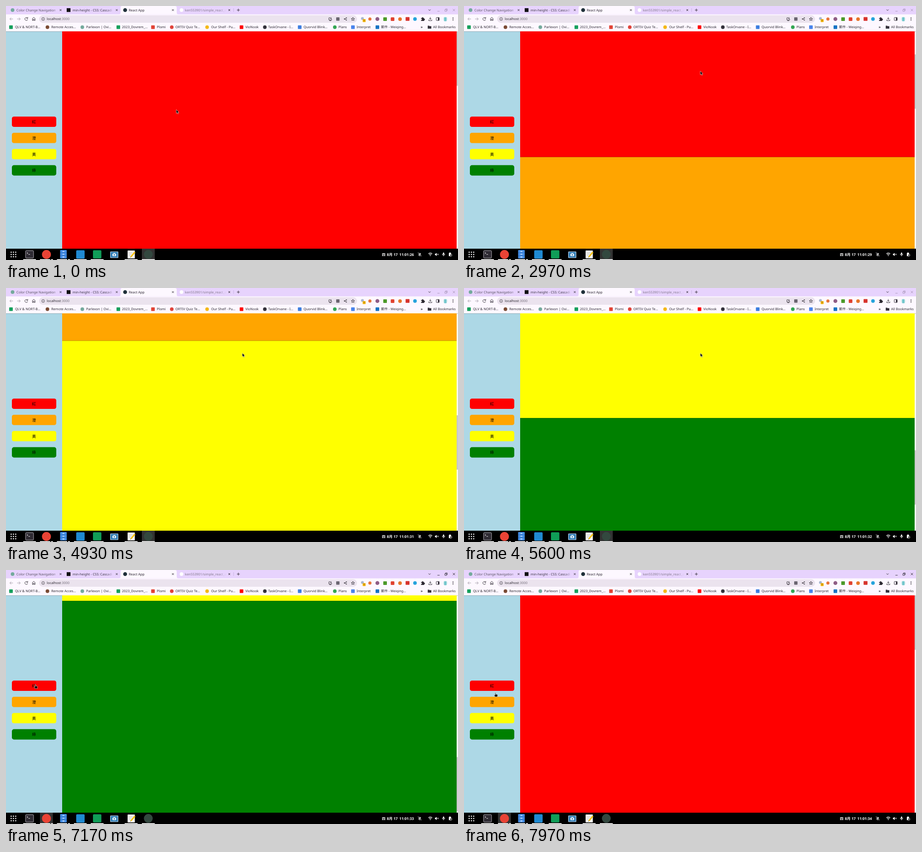
An HTML page for the animation above (8000 ms loop, 998x561 px).

```html
<!DOCTYPE html>
<html lang="zh-Hant">
<head>
<meta charset="utf-8">
<title>React App</title>
<style>
@property --scroll { syntax: "<number>"; inherits: true; initial-value: 0; }
html, body { margin: 0; width: 100%; height: 100%; overflow: hidden; background: #000; }
svg { display: block; width: 998px; height: 561px; }
text {
  font: 7.4px "Noto Sans", "Noto Sans CJK TC", sans-serif;
  fill: #2b2730; text-rendering: geometricPrecision; white-space: pre;
}
.line { fill: none; stroke: #36313b; stroke-width: 1; }
.dim { stroke: #a69eac; }
.btn text { font-family: "Noto Sans CJK TC", "Noto Sans CJK", sans-serif; font-size: 8.6px; fill: #000; text-anchor: middle; }
.clock text { font-size: 8px; font-weight: 600; fill: #fff; }
.tray { fill: none; stroke: #fff; stroke-width: 1; }

#web { animation: scroll 8s infinite linear; }
#page { transform: matrix(1, 0, 0, 1, 0, calc(var(--scroll) * -1)); }
#thumb { transform: matrix(1, 0, 0, 1, 0, calc(var(--scroll) * .25)); }
#cursor { animation: move 8s infinite ease-in-out; }
#secs { animation: tick 8s infinite; }
.focus { opacity: 0; animation: show 8s infinite step-end; }
.blur { animation: hide 8s infinite step-end; }
#arrow { animation: arrow 8s infinite step-end; }
#hand { opacity: 0; animation: hand 8s infinite step-end; }

@keyframes scroll {
  0%, 28% { --scroll: 0; }
  28.375% { --scroll: 8; animation-timing-function: ease-out; }
  30.875%, 33.375% { --scroll: 62; }
  43.375%, 48.5% { --scroll: 435; }
  48.75% { --scroll: 436.5; }
  57.5%, 60% { --scroll: 852; }
  61.625% { --scroll: 899; }
  70% { --scroll: 1208; animation-timing-function: ease-out; }
  77.5%, 89.04% { --scroll: 1440; animation-timing-function: ease-in-out; }
  98.04%, 100% { --scroll: 0; }
}
@keyframes move {
  0%, 4% { transform: matrix(1, 0, 0, 1, 376, 228.8); }
  23%, 28.4% { transform: matrix(1, 0, 0, 1, 521.5, 142.4); }
  31%, 77.5% { transform: matrix(1, 0, 0, 1, 521.7, 143.6); }
  86.5%, 95% { transform: matrix(1, 0, 0, 1, 65, 252.6); }
  99.4%, 100% { transform: matrix(1, 0, 0, 1, 69.5, 270.8); }
}
@keyframes tick {
  0% { transform: matrix(1, 0, 0, 1, 0, 0); animation-timing-function: step-end; }
  5% { transform: matrix(1, 0, 0, 1, 0, 0); animation-timing-function: steps(7, jump-both); }
  92.5%, 100% { transform: matrix(1, 0, 0, 1, 0, -112); }
}
@keyframes show { 0% { opacity: 0; } 88.5%, 100% { opacity: 1; } }
@keyframes hide { 0% { opacity: 1; } 88.5%, 100% { opacity: 0; } }
@keyframes arrow { 0% { opacity: 1; } 84.8%, 100% { opacity: 0; } }
@keyframes hand { 0% { opacity: 0; } 84.8%, 100% { opacity: 1; } }
</style>
</head>
<body>
<svg viewBox="0 0 998 561">
  <defs>
    <clipPath id="view"><rect x="124" y="56" width="871" height="480"/></clipPath>
    <clipPath id="digits"><rect x="885" y="542" width="24" height="13"/></clipPath>
    <linearGradient id="fade"><stop stop-color="#e7d3fd" stop-opacity="0"/><stop offset="1" stop-color="#e7d3fd"/></linearGradient>
    <path id="x" d="M-2 -2L2 2M2 -2L-2 2"/>
    <g id="controls" fill="none">
      <path d="M952.5 11.5h5M986.5 6.5l5 5m0-5l-5 5"/>
      <path d="M969 8h3.8v3.8H969zM970.4 8V6.5h3.8v3.8h-1.4"/>
    </g>
  </defs>

  <!-- tab strip -->
  <rect width="998" height="19" fill="#e7d3fd"/>
  <path d="M249 18.5Q253 18.5 253 14.5V4Q253 0 257 0H373Q377 0 377 4V14.5Q377 18.5 381 18.5Z" fill="#fdf8ff"/>
  <circle cx="14.5" cy="9" r="4" fill="#74aa9c"/>
  <text x="23" y="11.6" style="fill:#5c5664">Color Change Navigation</text>
  <rect x="134" y="4.8" width="8.4" height="8.4" fill="#111"/>
  <text x="147" y="11.6" style="fill:#3e3945">min-height - CSS: Cascadi</text>
  <circle cx="263" cy="9" r="4.3" fill="#20313a"/>
  <text x="271" y="11.6">React App</text>
  <circle cx="387.5" cy="9" r="4" fill="#fff"/>
  <text x="395" y="11.6" style="fill:#847b8d">ken553901/simple_react_co</text>
  <g fill="url(#fade)">
    <rect x="104" y="2" width="9" height="15"/><rect x="222" y="2" width="15" height="15"/><rect x="470" y="2" width="17" height="15"/>
  </g>
  <g fill="#e7d3fd"><rect x="113" y="2" width="18" height="15"/><rect x="237" y="2" width="12" height="15"/><rect x="487" y="2" width="20" height="15"/></g>
  <g class="line">
    <use href="#x" x="120.5" y="9"/><use href="#x" x="244.5" y="9"/><use href="#x" x="368.5" y="9"/><use href="#x" x="493" y="9"/>
    <path d="M509.8 9h6.4M513 5.8v6.4M932.8 7.7l2.4 2.4 2.4-2.4"/>
    <path d="M502.5 5v8" stroke="#b9a4d0" stroke-width=".6"/>
  </g>
  <use href="#controls" class="blur" stroke="#a593b6" stroke-width=".9"/>
  <use href="#controls" class="focus" stroke="#2b2730" stroke-width=".9"/>

  <!-- toolbar -->
  <rect y="18.5" width="998" height="37.8" fill="#fdf8ff"/>
  <rect x="73" y="20.5" width="702" height="16.4" rx="8.2" fill="#ebe3ee"/>
  <g class="line">
    <path class="dim" d="M15.5 28.7H8.5M11.6 25.5L8.4 28.7l3.2 3.2"/>
    <path class="dim" d="M24.5 28.7h7M28.4 25.5l3.2 3.2-3.2 3.2"/>
    <path d="M47.4 26.8A3.2 3.2 0 1 0 47.9 29.6M48 24.6v2.7h-2.7"/>
    <path d="M58.4 32V27.6L61.3 25l2.9 2.6V32h-2v-2.6h-1.8V32z"/>
    <circle cx="82" cy="28.7" r="3.2" stroke-width=".8"/><path d="M82 28.2v2.2M82 26.6v.8" stroke-width=".8"/>
  </g>
  <text x="90" y="31.3">localhost<tspan fill="#77707d">:3000</tspan></text>
  <g class="line">
    <path d="M716 26h-3v5h6v-2M717.5 25v3.6m-1.5-1.5l1.5 1.5 1.5-1.5M714 32.4h4"/>
    <path d="M747.4 28.7l4-2.2m-4 2.2l4 2.2"/>
    <path d="M766 25.2l1 2.4 2.6.2-2 1.7.7 2.5-2.3-1.4-2.3 1.4.7-2.5-2-1.7 2.6-.2z"/>
  </g>
  <rect x="729" y="25" width="7.4" height="7.4" rx="1" fill="#6a6570"/>
  <g fill="#36313b"><circle cx="747.2" cy="28.7" r="1.1"/><circle cx="751.6" cy="26.4" r="1.1"/><circle cx="751.6" cy="31" r="1.1"/></g>
  <circle cx="787" cy="27.6" r="3.2" fill="#a9b7cf"/>
  <rect x="787.5" y="29" width="6.6" height="6.4" rx="1" fill="#f5b50a"/>
  <text x="789.2" y="34.3" style="font-size:5.4px">1</text>
  <circle cx="803.5" cy="28.7" r="3.5" fill="#e8743b"/>
  <circle cx="820" cy="28.7" r="4.3" fill="#8f5c86"/>
  <rect x="833" y="25" width="8" height="8" rx="1" fill="#4c9a2a"/>
  <rect x="849.5" y="25" width="8" height="8" rx="1.5" fill="#e0412f"/>
  <circle cx="870" cy="29" r="4" fill="#e8752a"/>
  <rect x="882.3" y="24.6" width="8.6" height="8.2" rx="1" fill="#d7322d"/>
  <circle cx="903" cy="28.7" r="4" fill="#26a3dc"/>
  <path d="M916.5 26.4h2.1a1.4 1.4 0 1 1 2.7 0h2v2.1a1.4 1.4 0 1 1 0 2.7v1.8h-6.8v-2.2a1.3 1.3 0 1 0 0-2.4z" fill="#2b2730"/>
  <g class="line">
    <path d="M936.8 24.6v5m-2.3-2.2l2.3 2.2 2.3-2.2M933.4 30v2.4h6.8V30"/>
    <rect x="950" y="25.4" width="6.6" height="6.6" rx=".8"/><path d="M955 25.4v6.6" stroke-width="2.6"/>
  </g>
  <circle cx="970" cy="28.7" r="5.4" fill="#e3f2f3"/><rect x="967.3" y="25" width="5.4" height="8.4" rx="1" fill="#72c5cc"/>
  <g fill="#2b2730"><circle cx="987" cy="26" r=".9"/><circle cx="987" cy="28.7" r=".9"/><circle cx="987" cy="31.4" r=".9"/></g>

  <g id="marks"></g>
  <text x="915.5" y="49.2" style="font-weight:600">»</text>
  <path d="M931.2 43.4h3l1 1.1h3.9v5.6h-7.9z" fill="#36313b"/>
  <text x="943" y="49.4">All Bookmarks</text>

  <!-- web page -->
  <g id="web">
    <rect y="56.3" width="124" height="480" fill="#add8e6"/>
    <g clip-path="url(#view)">
      <g id="page">
        <rect x="124" y="56" width="871" height="480" fill="red"/>
        <rect x="124" y="536" width="871" height="480" fill="orange"/>
        <rect x="124" y="1016" width="871" height="480" fill="yellow"/>
        <rect x="124" y="1496" width="871" height="480" fill="green"/>
      </g>
    </g>
    <rect x="995" y="56.3" width="3" height="480" fill="#fafafa"/>
    <rect id="thumb" x="995" y="56.3" width="3" height="120" fill="#c8c8c8"/>
    <g class="btn" id="nav"></g>
  </g>

  <!-- taskbar -->
  <rect y="536" width="998" height="25" fill="#000"/>
  <rect class="blur" x="300" y="536" width="28.5" height="25" fill="#333"/>
  <rect class="focus" x="75" y="536" width="28.5" height="25" fill="#333"/>
  <g id="dots" fill="#fff"></g>
  <path d="M38 559.2h28v1.8H38zM75 559.2h22.5v1.8H75zM99.5 559.2h4v1.8h-4zM112.5 559.2H135v1.8h-22.5zM137 559.2h4v1.8h-4zM150 559.2h28v1.8h-28zM187 559.2h28.5v1.8H187zM262 559.2h28.5v1.8H262zM300 559.2h28.5v1.8H300z" fill="#fff"/>
  <rect x="43.2" y="540.4" width="17.6" height="16.4" rx="1.6" fill="#2e2b33" stroke="#b9b6bd"/>
  <path d="M46 544l2.4 1.8-2.4 1.8M49.5 548.6h3.5" fill="none" stroke="#fff" stroke-width=".9"/>
  <circle cx="89.3" cy="548.8" r="10" fill="#e94335"/>
  <rect x="119.5" y="539" width="14.6" height="18.6" rx="1.4" fill="#438de6"/>
  <path d="M120 545h13.6M120 551.2h13.6" stroke="#2564b0" stroke-width=".8"/>
  <path d="M124.5 541.4h4.6v1.6h-4.6zM124.5 547.4h4.6v1.6h-4.6zM124.5 553.6h4.6v1.6h-4.6z" fill="#dcebff"/>
  <rect x="155" y="539.5" width="18.6" height="18.6" rx="2" fill="#1f8ad2"/>
  <rect x="192" y="539.5" width="18.6" height="18" rx="2" fill="#109d58"/>
  <rect x="230" y="542.2" width="18" height="14.4" rx="1.4" fill="#a9c6dd"/>
  <rect x="231.4" y="543.6" width="15.2" height="11.6" fill="#2b7ab5"/>
  <path d="M235 547h2l.8-1.2h2.6l.8 1.2h2v5.4H235z" fill="#e9f2f8"/><circle cx="239.1" cy="549.6" r="1.5" fill="#2b7ab5"/>
  <rect x="268.5" y="540" width="16" height="17.4" rx="1" fill="#f6f5f4"/>
  <path d="M270.5 545h9M270.5 548h7M270.5 551h5" stroke="#b5b2ae" stroke-width=".7"/>
  <path d="M274.4 555.4l1-3.4 8-9.4 2.4 2-8 9.4z" fill="#f5c211"/><path d="M274.4 555.4l.6-2 1.2 1z" fill="#333"/>
  <circle cx="314.2" cy="548.6" r="9.8" fill="#33483f"/>

  <g class="clock">
    <text x="830" y="551.6" style="font-size:7.8px">四</text>
    <text x="841" y="551.6">8月 17</text>
    <text x="868.6" y="551.6">11:01:</text>
    <g clip-path="url(#digits)"><g id="secs"></g></g>
  </g>
  <g class="tray">
    <path d="M910.4 551h6.4c-1-1-1-1.8-1-3.4a2.2 2.2 0 0 0-4.4 0c0 1.6 0 2.4-1 3.4z" fill="#fff" stroke="none"/>
    <path d="M909.8 544.6l7.6 8" stroke="#000" stroke-width="1.8"/><path d="M909.6 544.6l7.6 8M912.8 552.4h1.6"/>
    <path d="M932.6 547.2q4.2-3.6 8.4 0M934.2 549.2q2.6-2.2 5.2 0" stroke-width="1.2"/><circle cx="936.8" cy="551.2" r="1" fill="#fff" stroke="none"/>
    <path d="M947 547.2h1.7l2.3-2v7l-2.3-2H947z" fill="#fff" stroke="none"/><path d="M952.2 547.2l2.8 2.9m0-2.9l-2.8 2.9"/>
    <rect x="964.7" y="544.6" width="2.8" height="4.8" rx="1.4" fill="#fff" stroke="none"/>
    <path d="M963.2 547.6a2.9 2.9 0 0 0 5.8 0M966.1 550.6v2"/>
    <path d="M977.8 545.6h1.2v-1h2.6v1h1.2v6.8h-5z" fill="#fff" stroke="none"/>
    <circle cx="982.4" cy="550.4" r="2" fill="#000"/>
  </g>

  <g id="cursor" stroke="#fff" stroke-width=".6" stroke-linejoin="round">
    <path id="arrow" d="M0 0V8.3L1.9 6.6 3.3 9.6 4.7 9 3.4 6.1H6Z"/>
    <path id="hand" d="M-.8.8Q-.8 0 0 0T.8.8V3.5L3.9 4.2Q5 4.5 4.8 5.7L4.1 9.2H-.8L-3 5.7Q-3.2 4.7-2.2 4.8L-.8 5.8Z"/>
  </g>
</svg>
<script>
const fill = (id, html) => { document.getElementById(id).innerHTML = html; };

// shape (s = square, c = circle), icon centre, colour, label x, label
const marks = [
  ['s', 11, '#16a05d', 20, 'QLV &amp; NORT-B…'],
  ['c', 91.5, '#7a4a33', 100, 'Remote Acces…'],
  ['c', 168.5, '#74aa9c', 177, 'Parlexon | Ovi…'],
  ['s', 248, '#16a05d', 256, '2023_Dovrem_…'],
  ['s', 324.5, '#e14335', 333, 'Plomi'],
  ['c', 366, '#e0433a', 374, 'ORTIV Quiz Te…'],
  ['c', 444, '#f4b919', 453, 'Our Shelf - Pu…'],
  ['s', 520, '#f00', 528.5, 'VioNook'],
  ['c', 571.5, '#33313a', 579, 'TaskOrvane - I…'],
  ['s', 648.5, '#3b7de0', 657, 'Quorvid Blink…'],
  ['c', 726, '#34a653', 734, 'Plans'],
  ['s', 766, '#4a84ec', 774, 'Interpret'],
  ['s', 820, '#1673c4', 828, '郵件 - Weiqing…']
];
fill('marks', marks.map(([shape, x, color, tx, label]) =>
  (shape === 's'
    ? `<rect x="${x - 4}" y="42.7" width="8" height="8" rx="1" fill="${color}"/>`
    : `<circle cx="${x}" cy="46.7" r="4" fill="${color}"/>`) +
  `<text x="${tx}" y="49.4">${label}</text>`).join(''));

const buttons = [['red', '紅'], ['orange', '澄'], ['yellow', '黃'], ['green', '綠']];
fill('nav', buttons.map(([color, label], i) => {
  const y = 244.2 + i * 35.8;
  return `<rect x="13" y="${y}" width="98" height="22.8" rx="4.5" fill="${color}"/>` +
    `<text x="61.8" y="${y + 14.8}">${label}</text>`;
}).join(''));

fill('dots', Array.from({ length: 9 }, (_, i) =>
  `<circle cx="${11.4 + i % 3 * 5}" cy="${543.8 + Math.floor(i / 3) * 5}" r="1.4"/>`).join(''));

fill('secs', Array.from({ length: 9 }, (_, i) =>
  `<text x="891.5" y="${551.6 + i * 14}">${26 + i}</text>`).join(''));
</script>
</body>
</html>
```
